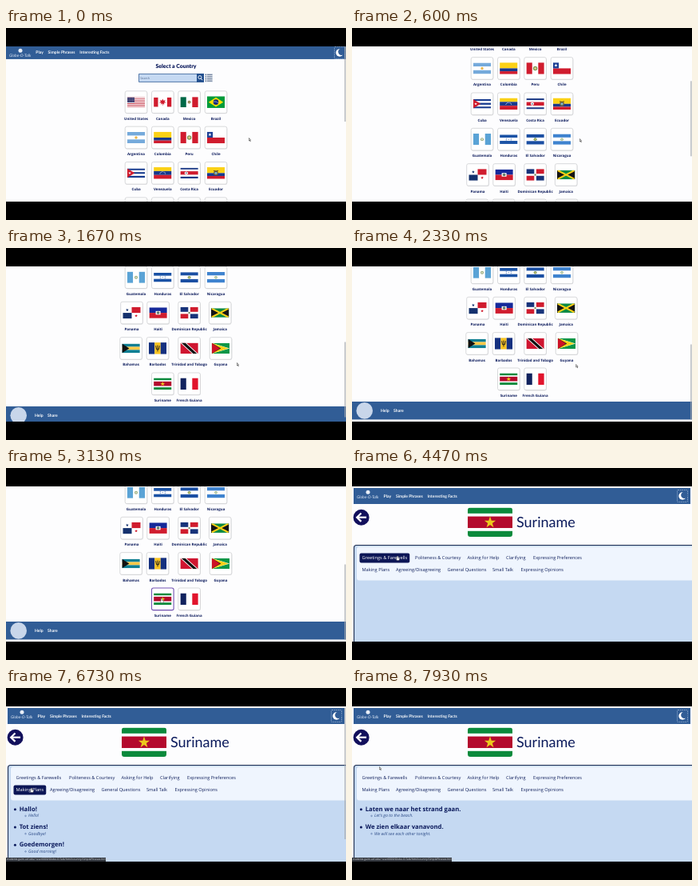
An HTML page with a canvas that plays this animation: 426x240 px, repeating every 8 s.

```html
<!DOCTYPE html>
<html lang="en">
<head>
<meta charset="utf-8">
<title>Country phrases</title>
<style>
  html, body { margin: 0; width: 100%; height: 100%; overflow: hidden; background: #000; }
  canvas { display: block; width: 426px; height: 240px; }
</style>
</head>
<body>
<canvas id="stage" width="426" height="240"></canvas>
<script>
const ctx = document.getElementById('stage').getContext('2d');
const LOOP = 8000, TOP = 23, BOTTOM = 217;
const PAGE_SWAP = 3330, GREETINGS_AT = 4800, PLANS_AT = 6850;
const BLUE = '#315d96', NAVY = '#0b1a5c', PALE = '#c5d9f2';
const BRAND = 'Globe-O-Talk';
const display = (size, weight = 700) => `${weight} ${size}px Lato, sans-serif`;
const body = (size, style = '') => `${style} ${size}px "Open Sans", sans-serif`;

// Drawing helpers
function rect(x, y, w, h, color) {
  ctx.fillStyle = color;
  ctx.fillRect(x, y, w, h);
}
function round(x, y, w, h, r, fill, stroke, line = 1) {
  ctx.beginPath();
  ctx.roundRect(x, y, w, h, r);
  if (fill) { ctx.fillStyle = fill; ctx.fill(); }
  if (stroke) { ctx.strokeStyle = stroke; ctx.lineWidth = line; ctx.stroke(); }
}
function disc(x, y, r, color) {
  ctx.beginPath();
  ctx.arc(x, y, r, 0, 7);
  ctx.fillStyle = color;
  ctx.fill();
}
function ring(x, y, r, color, line) {
  ctx.beginPath();
  ctx.arc(x, y, r, 0, 7);
  ctx.strokeStyle = color;
  ctx.lineWidth = line;
  ctx.stroke();
}
function poly(color, ...p) {
  ctx.beginPath();
  for (let i = 0; i < p.length; i += 2) ctx.lineTo(p[i], p[i + 1]);
  ctx.closePath();
  ctx.fillStyle = color;
  ctx.fill();
}
function path(color, line, ...p) {
  ctx.beginPath();
  for (let i = 0; i < p.length; i += 2) ctx.lineTo(p[i], p[i + 1]);
  ctx.strokeStyle = color;
  ctx.lineWidth = line;
  ctx.stroke();
}
function star(x, y, r, color, points = 5, inner = 0.4) {
  const p = [];
  for (let i = 0; i < points * 2; i++) {
    const a = i * Math.PI / points, d = i % 2 ? r * inner : r;
    p.push(x + d * Math.sin(a), y - d * Math.cos(a));
  }
  poly(color, ...p);
}
function text(str, x, y, font, color, align = 'left') {
  ctx.font = font;
  ctx.fillStyle = color;
  ctx.textAlign = align;
  ctx.textBaseline = 'middle';
  ctx.fillText(str, x, y);
}

// Flags are painted in a W x H box
const W = 22.4, H = 14.6, CX = W / 2, CY = H / 2;
const RED = '#d01c2e', WHITE = '#fff', GOLD = '#fbd116', GREEN = '#0b8a3c', SKY = '#75aadb';
function bands(colors, weights, vertical) {
  const total = weights.reduce((a, b) => a + b);
  let at = 0;
  colors.forEach((c, i) => {
    const size = weights[i] / total;
    if (vertical) rect(at * W, 0, size * W, H, c);
    else rect(0, at * H, W, size * H, c);
    at += size;
  });
}
const rows = (colors, ...weights) => bands(colors, weights.length ? weights : colors.map(() => 1));
const cols = (colors, ...weights) => bands(colors, weights.length ? weights : colors.map(() => 1), true);
const hoist = (color, reach) => poly(color, 0, 0, reach, CY, 0, H);
function crest(x, y, r, color, core) {
  disc(x, y, r, color);
  disc(x, y, r * 0.55, core);
}

const flags = {
  'United States': [12.4, () => {
    for (let i = 0; i < 13; i++) rect(0, i * H / 13, W, H / 13, i % 2 ? WHITE : '#c33545');
    rect(0, 0, 9.2, H * 7 / 13, '#3c3b6e');
    for (let i = 0; i < 20; i++) disc(1 + i % 5 * 1.8, 1.1 + (i / 5 | 0) * 1.9, 0.3, WHITE);
  }],
  'Canada': [12, () => {
    cols([RED, WHITE, RED], 1, 2, 1);
    star(CX, CY - 0.3, 4.6, RED, 7, 0.5);
    rect(CX - 0.3, CY, 0.6, 5, RED);
  }],
  'Mexico': [13, () => { cols(['#006847', WHITE, RED]); crest(CX, CY, 2, '#8a7448', '#b9a878'); }],
  'Brazil': [14.6, () => {
    rect(0, 0, W, H, '#009b3a');
    poly('#fedf00', 2, CY, CX, 1.5, W - 2, CY, CX, H - 1.5);
    disc(CX, CY, 3.3, '#172b7b');
    path(WHITE, 0.5, CX - 3, CY - 0.6, CX, CY - 0.6, CX + 3, CY + 1);
  }],
  'Argentina': [14, () => { rows([SKY, WHITE, SKY]); star(CX, CY, 2, '#eab54a', 12, 0.7); }],
  'Colombia': [14.6, () => rows([GOLD, '#17398c', RED], 2, 1, 1)],
  'Peru': [14.6, () => { cols([RED, WHITE, RED]); crest(CX, CY, 2.7, '#7b9a55', '#dccb8c'); }],
  'Chile': [14.6, () => {
    rows([WHITE, RED]);
    rect(0, 0, 7.3, CY, '#1d3f94');
    star(3.65, 3.65, 2.2, WHITE);
  }],
  'Cuba': [11.6, () => {
    rows(['#173b8f', WHITE, '#173b8f', WHITE, '#173b8f']);
    hoist(RED, 9.5);
    star(3.2, CY, 2, WHITE);
  }],
  'Venezuela': [14.6, () => {
    rows([GOLD, '#17398c', RED]);
    for (let i = 0; i < 8; i++) {
      const a = Math.PI * (1.1 + i * 0.8 / 7);
      star(CX + 3.6 * Math.cos(a), CY + 1.8 + 3.4 * Math.sin(a), 0.7, WHITE);
    }
  }],
  'Costa Rica': [13.4, () => {
    rows(['#1b3a86', WHITE, RED, WHITE, '#1b3a86'], 1, 1, 2, 1, 1);
    crest(7.5, CY, 2.1, WHITE, '#7f95a8');
  }],
  'Ecuador': [14.6, () => {
    rows([GOLD, '#17398c', RED], 2, 1, 1);
    crest(CX, CY, 2.9, '#70633c', '#7eb4c8');
    path('#4d432c', 0.9, CX - 3, CY - 3, CX, CY - 2.3, CX + 3, CY - 3);
  }],
  'Guatemala': [14.2, () => { cols(['#5aa3d6', WHITE, '#5aa3d6']); crest(CX, CY, 2, '#8fa87c', '#e6e3c8'); }],
  'Honduras': [11.6, () => {
    rows(['#1a52a5', WHITE, '#1a52a5']);
    [[0, 0], [-3, -1.2], [3, -1.2], [-3, 1.2], [3, 1.2]].forEach(([x, y]) => star(CX + x, CY + y, 0.9, '#1a52a5'));
  }],
  'El Salvador': [13, () => { rows(['#1b4fa3', WHITE, '#1b4fa3']); crest(CX, CY, 2, '#6c8f56', '#d9c86f'); }],
  'Nicaragua': [13.4, () => { rows(['#3f83cf', WHITE, '#3f83cf']); crest(CX, CY, 1.8, '#a5b56a', '#b9d7e2'); }],
  'Panama': [14.6, () => {
    rect(0, 0, W, H, WHITE);
    rect(CX, 0, CX, CY, RED);
    rect(0, CY, CX, CY, '#14316e');
    star(W / 4, H / 4, 2, '#14316e');
    star(W * 0.75, H * 0.75, 2, RED);
  }],
  'Haiti': [13.6, () => {
    rows(['#15299a', RED]);
    rect(CX - 3, CY - 2.4, 6, 4.8, WHITE);
    crest(CX, CY, 1.9, '#6e8a60', '#526b7d');
  }],
  'Dominican Republic': [14.6, () => {
    rect(0, 0, W, H, WHITE);
    [['#17337a', 0, 0], [RED, 1, 0], [RED, 0, 1], ['#17337a', 1, 1]].forEach(([c, i, j]) =>
      rect(i * (CX + 1.3), j * (CY + 1.3), CX - 1.3, CY - 1.3, c));
    disc(CX, CY, 1.2, '#768d62');
  }],
  'Jamaica': [11.6, () => {
    rect(0, 0, W, H, '#0a8a43');
    poly('#141414', 0, 0, CX, CY, 0, H);
    poly('#141414', W, 0, CX, CY, W, H);
    path(GOLD, 2.4, 0.9, 0.6, W - 0.9, H - 0.6);
    path(GOLD, 2.4, W - 0.9, 0.6, 0.9, H - 0.6);
  }],
  'Bahamas': [11.6, () => { rows(['#0f7f93', '#f7c948', '#0f7f93']); hoist('#111', 9); }],
  'Barbados': [14.6, () => {
    cols(['#14307f', '#f9c322', '#14307f']);
    path('#1a1a1a', 0.9, CX - 2.4, 4, CX - 1.5, 8.5, CX + 1.5, 8.5, CX + 2.4, 4);
    path('#1a1a1a', 0.9, CX, 3.4, CX, 11.2);
  }],
  'Trinidad and Tobago': [13.6, () => {
    rect(0, 0, W, H, '#cf1530');
    poly(WHITE, 0, 0, 7.4, 0, W, H, W - 7.4, H);
    poly('#111', 1.3, 0, 6.1, 0, W - 1.3, H, W - 6.1, H);
  }],
  'Guyana': [13.2, () => {
    rect(0, 0, W, H, '#0c9647');
    hoist(WHITE, W);
    hoist('#fcd116', W - 1.5);
    hoist('#111', 11.5);
    hoist('#ce1126', 10.2);
  }],
  'Suriname': [14.6, () => {
    rows([GREEN, WHITE, '#b40a2d', WHITE, GREEN], 2, 1, 4, 1, 2);
    star(CX, CY + 0.1, 3, '#ecc81d');
  }],
  'French Guiana': [14.6, () => cols(['#12235e', WHITE, '#e1142c'])]
};

function paintFlag(name, x, y, w, h, radius = 0) {
  ctx.save();
  ctx.translate(x, y);
  ctx.scale(w / W, h / H);
  ctx.beginPath();
  ctx.roundRect(0, 0, W, H, radius);
  ctx.clip();
  flags[name][1]();
  ctx.restore();
}

const regular = [163, 196.3, 229.6, 263];
const columns = [regular, regular, regular, regular,
  [157.5, 190.6, 229.6, 268.2], [156.6, 190, 229.6, 269], [196.3, 229.6]];
const cards = Object.keys(flags).map((name, i) => {
  const row = i >> 2;
  return { name, x: columns[row][i % 4], y: 92.7 + row * 44.35 };
});

// Piecewise motion through [time, value...] keys
function track(t, keys, ease = u => u) {
  const i = keys.findIndex(k => k[0] > t);
  if (i < 0) return keys[keys.length - 1].slice(1);
  if (!i) return keys[0].slice(1);
  const a = keys[i - 1], b = keys[i];
  const u = ease((t - a[0]) / (b[0] - a[0]));
  return a.slice(1).map((v, k) => v + (b[k + 1] - v) * u);
}
const smooth = u => u * u * (3 - 2 * u);
const scrollKeys = [[0, 0], [150, 10], [600, 86.5], [1100, 146], [1670, 189], [1900, 195]];
const cursorKeys = [[0, 304, 137], [600, 285, 138], [1670, 289, 143], [2200, 289, 143],
  [2900, 195, 164], [3330, 195, 164], [4400, 57, 111], [4900, 57, 111], [5350, 93, 111],
  [5900, 93, 111], [6600, 32, 126], [7100, 32, 126], [7700, 34, 98]];

function topBar(x, y, w, h, brandX, navX, moonX) {
  const mid = y + h / 2;
  rect(x, y, w, h, BLUE);
  disc(brandX + 14, y + 5.2, 2.5, '#e9eff8');
  text(BRAND, brandX, y + 11.6, display(5, 'italic 400'), '#dfe8f5');
  ['Play', 'Simple Phrases', 'Interesting Facts'].forEach((label, i) =>
    text(label, navX + [0, 15.3, 55][i], mid, display(5.05), WHITE));
  ctx.setLineDash([1.5, 1]);
  round(moonX - 6.5, mid - 7.5, 13, 15, 1, null, '#a9c0df', 0.7);
  ctx.setLineDash([]);
  disc(moonX, mid, 4.7, WHITE);
  disc(moonX + 2.4, mid - 1.1, 4.2, BLUE);
}

function searchBar() {
  rect(166.5, 57.5, 73, 10, PALE);
  round(166.5, 57.5, 73, 10, 0, null, BLUE, 0.8);
  text('Search', 168.3, 62.7, body(3.7), '#50688d');
  rect(239, 57, 9, 11, '#23508f');
  ring(242.9, 61.7, 2, WHITE, 0.9);
  path(WHITE, 1, 244.3, 63.2, 246, 65.2);
  rect(249, 57, 10, 11, '#e3e8ef');
  for (let i = 0; i < 4; i++) {
    rect(249.7, 57.8 + i * 2.6, 1.4, 1.3, '#566a8c');
    rect(252, 57.8 + i * 2.6, 6.5, 1.3, '#74849f');
  }
}

function thumb(y, h) {
  rect(424.3, y, 1.2, h, '#a6a9ad');
}

function countryPage(scroll, mouse) {
  ctx.save();
  ctx.translate(0, -scroll);
  topBar(0, 23, 426, 16, 4, 37.3, 418);
  text('Select a Country', 213, 47.7, display(6.9, 900), NAVY, 'center');
  searchBar();
  for (const { name, x, y } of cards) {
    const hover = Math.abs(mouse[0] - x) < 14 && Math.abs(mouse[1] + scroll - y) < 14;
    round(x - 13.3, y - 13, 27.6, 27.6, 2.2, '#e4e4e6');
    round(x - 13.8, y - 13.8, 27.6, 27.6, 2.2, WHITE, hover ? '#7655b5' : '#c9cacd', hover ? 1.1 : 0.7);
    const h = flags[name][0];
    paintFlag(name, x - W / 2, y - h / 2, W, h);
    text(name, x, y + 20.9, body(4.45, 'bold'), NAVY, 'center');
  }
  rect(0, 387, 426, 22.4, BLUE);
  disc(15.7, 398.4, 10.3, '#c8d6ea');
  text('Help', 36, 398.6, display(5.1), WHITE);
  text('Share', 52, 398.6, display(5.1), WHITE);
  ctx.restore();
  thumb(23 + scroll / 2, 94);
}

const tabs = [
  ['Greetings & Farewells', 12.5, 112.6], ['Politeness & Courtesy', 79, 112.6], ['Asking for Help', 144.4, 112.6],
  ['Clarifying', 193, 112.6], ['Expressing Preferences', 227, 112.6], ['Making Plans', 12.5, 127.6],
  ['Agreeing/Disagreeing', 55, 127.6], ['General Questions', 119.6, 127.6], ['Small Talk', 176, 127.6],
  ['Expressing Opinions', 211.5, 127.6]
];
const greetings = [['Hallo!', 'Hello!'], ['Tot ziens!', 'Goodbye!'], ['Goedemorgen!', 'Good morning!']];
const plans = [['Laten we naar het strand gaan.', 'Let\u2019s go to the beach.'],
  ['We zien elkaar vanavond.', 'We will see each other tonight.']];

function overTab([label, x, y], mouse) {
  ctx.font = body(5.65);
  const w = ctx.measureText(label).width;
  return mouse[0] > x - 3 && mouse[0] < x + w + 3 && Math.abs(mouse[1] - y) < 6 ? w : 0;
}

function phrasePage(t, mouse) {
  topBar(2, 25, 422, 20, 6, 39.6, 414);
  disc(11.6, 61.7, 10, '#12105c');
  path(WHITE, 2.2, 18, 61.7, 6.5, 61.7);
  path(WHITE, 2.2, 11.5, 56.5, 6.2, 61.7, 11.5, 66.9);
  paintFlag('Suriname', 145, 49.6, 56, 36.5, 1.3);
  text('Suriname', 206, 69, display(18, 400), NAVY);

  round(2.5, 96.5, 440, 140, 3, PALE, '#1b2b4e', 1.1);
  round(6, 98.5, 436, 42, 3, '#eff5fe');
  for (const tab of tabs) {
    const [label, x, y] = tab, w = overTab(tab, mouse);
    if (w) round(x - 3, y - 6, w + 6, 12, 2, '#0c1656');
    text(label, x, y, body(5.65), w ? WHITE : '#14245f');
  }

  if (t < GREETINGS_AT) return;
  const phrases = t < PLANS_AT ? greetings : plans;
  phrases.forEach(([phrase, meaning], i) => {
    const y = 151.8 + i * 22.25;
    disc(11.4, y, 1.5, NAVY);
    text(phrase, 16.7, y, body(7.7, 'bold'), NAVY);
    ring(24.5, y + 8.1, 0.8, '#34558f', 0.5);
    text(meaning, 28, y + 8.1, body(5.3, 'italic'), '#2b4a86');
  });
  if (phrases === greetings) thumb(25, 164);
  rect(0, 212, 125, 5, '#34383f');
  text('students.gaim.ucf.edu/~user0000/' + BRAND + '/html/country/SimplePhrases.html#',
    1, 214.6, body(3.3), '#d5d9df');
}

function cursor(x, y, hand) {
  ctx.save();
  ctx.translate(x, y);
  if (hand) {
    round(-0.6, -1, 1.3, 4, 0.6, WHITE, '#222', 0.4);
    round(-1.4, 1.4, 3.8, 3, 1, WHITE, '#222', 0.4);
    rect(-0.4, 0, 0.9, 2.5, WHITE);
  } else {
    poly('#555', 0, 0, 0, 4.6, 1.1, 3.6, 2, 5.2, 2.7, 4.8, 2, 3.3, 3.3, 3.2);
    poly(WHITE, 0.5, 1.2, 0.5, 3.5, 1.2, 2.9, 2.1, 2.8);
  }
  ctx.restore();
}

function draw(t) {
  const mouse = track(t, cursorKeys, smooth);
  ctx.textRendering = 'geometricPrecision';
  rect(0, 0, 426, 240, '#000');
  ctx.save();
  ctx.beginPath();
  ctx.rect(0, TOP, 426, BOTTOM - TOP);
  ctx.clip();
  rect(0, TOP, 426, BOTTOM - TOP, '#fdfdfe');
  let hand;
  if (t < PAGE_SWAP) {
    countryPage(track(t, scrollKeys)[0], mouse);
    hand = t > 2750;
  } else {
    phrasePage(t, mouse);
    hand = tabs.some(tab => overTab(tab, mouse));
  }
  cursor(mouse[0], mouse[1], hand);
  ctx.restore();
}

function tick() {
  draw(performance.now() % LOOP);
  requestAnimationFrame(tick);
}
tick();
</script>
</body>
</html>
```
